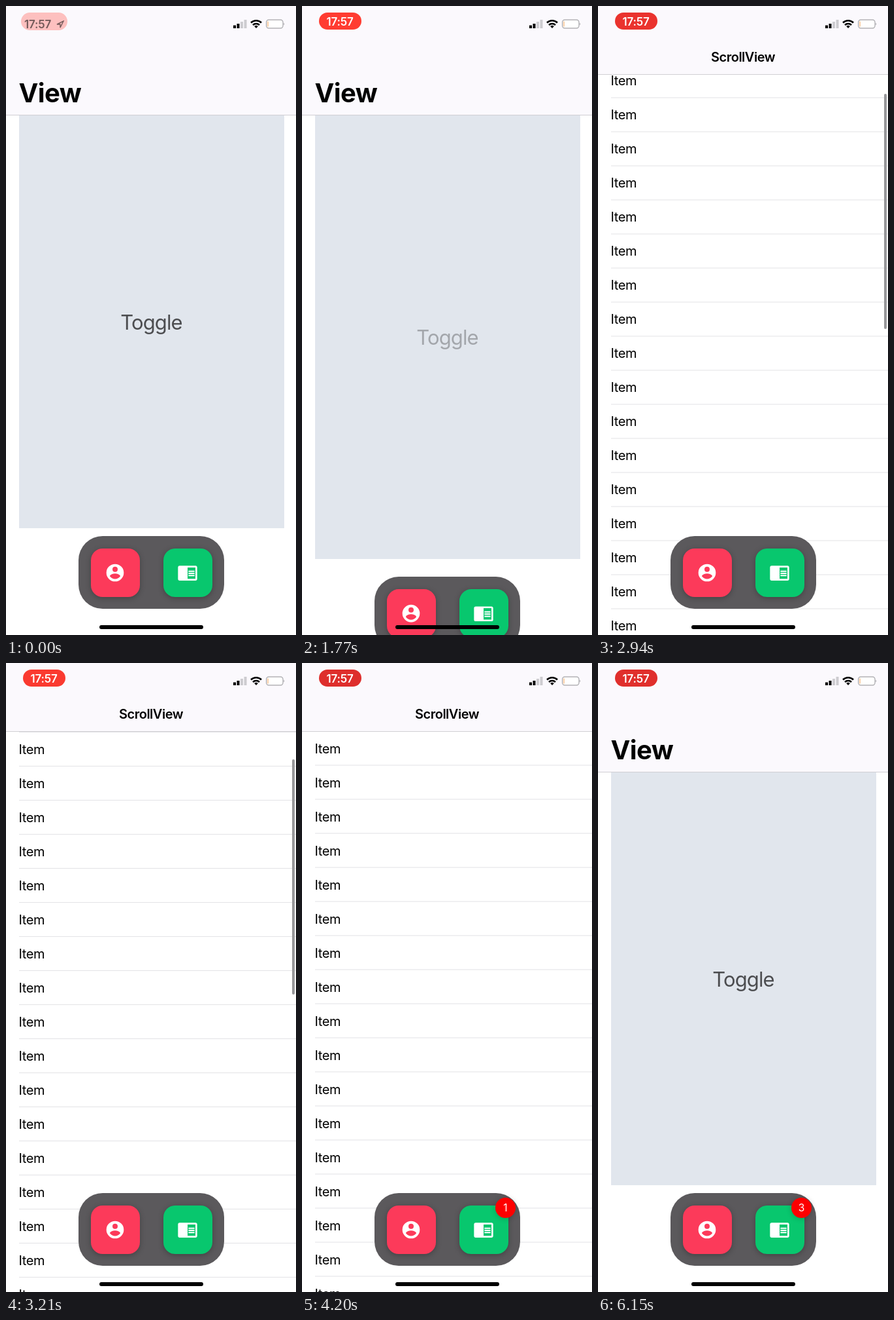
Write an HTML page that moves like this. It is 444 px wide and 960 px high and loops after 6180 ms.

```html
<!DOCTYPE html>
<html lang="en">
<head>
<meta charset="utf-8">
<style>
  html, body { margin: 0; width: 100%; height: 100%; overflow: hidden; background: #fff; }
  body, body * { box-sizing: border-box; }
  body { font-family: Inter, Roboto, sans-serif; color: #000; }
  #stage { position: relative; width: 444px; height: 960px; overflow: hidden; background: #fff; }
  #stage div, #stage svg { position: absolute; white-space: nowrap; }
  .screen { inset: 0; background: #fff; }
  .header { left: 0; top: 0; width: 444px; height: 166.5px; background: #fbf9fd; border-bottom: 1px solid #d0cfd3; }
  .clip { left: 0; top: 0; width: 444px; height: 166px; overflow: hidden; }
  .large { left: 19.5px; top: 108px; font: 700 40px/50px Inter, Roboto, sans-serif; letter-spacing: -.6px; }
  #small { left: 0; width: 444px; top: 66px; text-align: center; font: 600 20px/25px Inter, Roboto, sans-serif; letter-spacing: -.5px; }
  #panel { left: 19.5px; top: 166px; width: 406px; background: #e1e6ed; }
  #toggle { left: 0; width: 100%; text-align: center; color: #4c4d50; font-size: 31px; line-height: 40px; letter-spacing: -.9px; }
  #list { left: 0; top: 166px; width: 444px; }
  .row { left: 19.5px; width: 425px; height: 52px; border-bottom: 1px solid #e2e2e5; font-size: 20px; line-height: 52px; letter-spacing: -.4px; }
  #scroller { left: 438px; width: 3.5px; height: 359px; border-radius: 2px; background: #97979a; }
  #bar { left: 111px; top: 809px; width: 222.5px; height: 111px; border-radius: 37px; background: #5b595c; }
  .tab { top: 18.5px; width: 74.5px; height: 74.5px; border-radius: 18px; box-shadow: 0 2px 9px #0004; }
  .tab svg { left: 21px; top: 21px; width: 32px; height: 32px; fill: #fff; }
  #badge { left: 185px; top: 7px; width: 31px; height: 31px; border-radius: 50%; background: #fd0000; color: #fff; font-size: 15.5px; line-height: 31px; text-align: center; box-shadow: 0 1px 8px #0003; }
  #home { left: 143px; top: 945px; width: 159px; height: 5.5px; border-radius: 3px; background: #000; }
  .time { font: 600 17px/26px Inter, Roboto, sans-serif; letter-spacing: -.2px; text-align: center; }
  #pill { top: 10px; border-radius: 14px; }
  #old { left: 28px; top: 15px; color: #111; }
  #now { left: 26px; top: 10.5px; width: 64px; color: #fff; }
</style>
</head>
<body>
<div id="stage">
  <div class="screen" id="view">
    <div id="panel"><div id="toggle">Toggle</div></div>
    <div class="header"><div class="large">View</div></div>
  </div>
  <div class="screen" id="scroll">
    <div id="list"></div>
    <div id="scroller"></div>
    <div class="header" id="head">
      <div class="clip" id="clip"><div class="large" id="big">ScrollView</div></div>
      <div id="small">ScrollView</div>
    </div>
  </div>
  <div id="bar">
    <div class="tab" style="left:19px;background:#fc3a5a">
      <svg viewBox="0 0 24 24"><path d="M12 2a10 10 0 1 0 0 20 10 10 0 1 0 0-20zm0 3a3 3 0 1 1 0 6 3 3 0 1 1 0-6zm0 14.2c-2.5 0-4.71-1.28-6-3.22.03-1.99 4-3.08 6-3.08s5.97 1.09 6 3.08c-1.29 1.94-3.5 3.22-6 3.22z"/></svg>
    </div>
    <div class="tab" style="left:130px;background:#08c76e">
      <svg viewBox="0 0 24 24"><path fill-rule="evenodd" d="M3 4h18a2 2 0 0 1 2 2v13a2 2 0 0 1-2 2H3a2 2 0 0 1-2-2V6a2 2 0 0 1 2-2zm9 2v13h9V6zm1 3.5h7V11h-7zm0 2.5h7v1.5h-7zm0 2.5h7V16h-7z"/></svg>
    </div>
    <div id="badge"></div>
  </div>
  <div id="home"></div>
  <div id="pill"></div>
  <div class="time" id="old">17:57
    <svg style="left:49px;top:7px" width="12" height="12" viewBox="0 0 12 12"><path d="M1 6 11 1 6 11V6z" fill="none" stroke="#111" stroke-width="1.4"/></svg>
  </div>
  <div class="time" id="now">17:57</div>
  <svg style="left:344px;top:16px" width="88" height="24" viewBox="344 16 88 24">
    <path d="M348 29.5h4V34h-4zm5.5-2.5h4v7h-4z"/>
    <path d="M359 24h4v10h-4zm5.5-3h4v13h-4z" fill="#cdccd0"/>
    <g fill="none" stroke="#000" stroke-width="2.6">
      <path d="M375 25.5a11.5 11.5 0 0 1 16 0M378 29a7.2 7.2 0 0 1 10 0"/>
    </g>
    <path d="m383 34-2.8-3a4 4 0 0 1 5.6 0z"/>
    <rect x="398.6" y="21.2" width="25.4" height="12.6" rx="3.6" fill="#fff" stroke="#a5a4a8" stroke-width="1.2"/>
    <path d="M425.2 25.5q2 2 0 4z" fill="#a5a4a8"/>
    <path d="M401 23.5v8" stroke="#f9c08a" stroke-width="1.5"/>
  </svg>
</div>
<script>
  const LOOP = 6180;
  const $ = id => document.getElementById(id);
  const ramp = (t, a, b) => Math.min(1, Math.max(0, (t - a) / (b - a)));
  const ease = (t, a, b) => { const x = ramp(t, a, b); return x * x * (3 - 2 * x); };
  const mix = (a, b, x) => a + (b - a) * x;

  for (let i = 0; i < 26; i++) {
    const row = document.createElement('div');
    row.className = 'row';
    row.style.top = i * 52 + 'px';
    row.textContent = 'Item';
    $('list').append(row);
  }

  function status(t) {
    const on = ease(t, 0, 360);
    const glow = .5 + .5 * Math.cos((t - 1730) / 1700 * 2 * Math.PI);
    const pill = $('pill').style;
    pill.left = mix(23, 26, on) + 'px';
    pill.width = mix(71, 64.5, on) + 'px';
    pill.height = mix(27.5, 25.5, on) + 'px';
    pill.background = `rgb(${mix(221, 255, glow)},${mix(46, 60, glow)},${mix(44, 49, glow)})`;
    pill.opacity = mix(.3, 1, on);
    $('old').style.opacity = .58 * (1 - on);
    $('now').style.opacity = on;
  }

  function toggleBar(t) {
    const hidden = ease(t, 1050, 1350) - ease(t, 1597, 1897);
    const pressed = ease(t, 990, 1070) - ease(t, 1140, 1390)
                  + ease(t, 1540, 1620) - ease(t, 1690, 1930);
    const height = 631 + 123 * hidden;
    $('panel').style.height = height + 'px';
    $('toggle').style.top = height / 2 - 19 + 'px';
    $('toggle').style.opacity = 1 - .8 * pressed;
    $('bar').style.transform = `translateY(${163 * hidden}px)`;
  }

  // Both screens slide a third of the width while crossfading.
  function switchTab(t) {
    const p = ease(t, 2357, 2657) - ease(t, 5200, 5500);
    $('view').style.transform = `translateX(${-148 * p}px)`;
    $('view').style.opacity = 1 - p;
    $('scroll').style.transform = `translateX(${148 * (1 - p)}px)`;
    $('scroll').style.opacity = p;
  }

  function scrollList(t) {
    const y = 113.5 * (1 - (1 - ramp(t, 2750, 3350)) ** 3);
    const head = Math.max(105, 166.5 - y);
    $('list').style.transform = `translateY(${-y}px)`;
    $('head').style.height = head + 'px';
    $('clip').style.top = '100px';
    $('clip').style.height = Math.max(0, head - 101) + 'px';
    $('big').style.top = 8 - y + 'px';
    $('small').style.opacity = ramp(y, 42, 60);
    $('scroller').style.top = head + y * .375 + 'px';
    $('scroller').style.opacity = ramp(t, 2750, 2800) - ramp(t, 3500, 3800);
  }

  function badge(t) {
    const count = [3900, 4500, 5000].filter(at => t >= at).length;
    $('badge').textContent = count;
    $('badge').style.opacity = count ? 1 : 0;
  }

  const start = performance.now();
  function draw() {
    const t = (performance.now() - start) % LOOP;
    for (const part of [status, toggleBar, switchTab, scrollList, badge]) part(t);
    requestAnimationFrame(draw);
  }
  draw();
</script>
</body>
</html>
```
